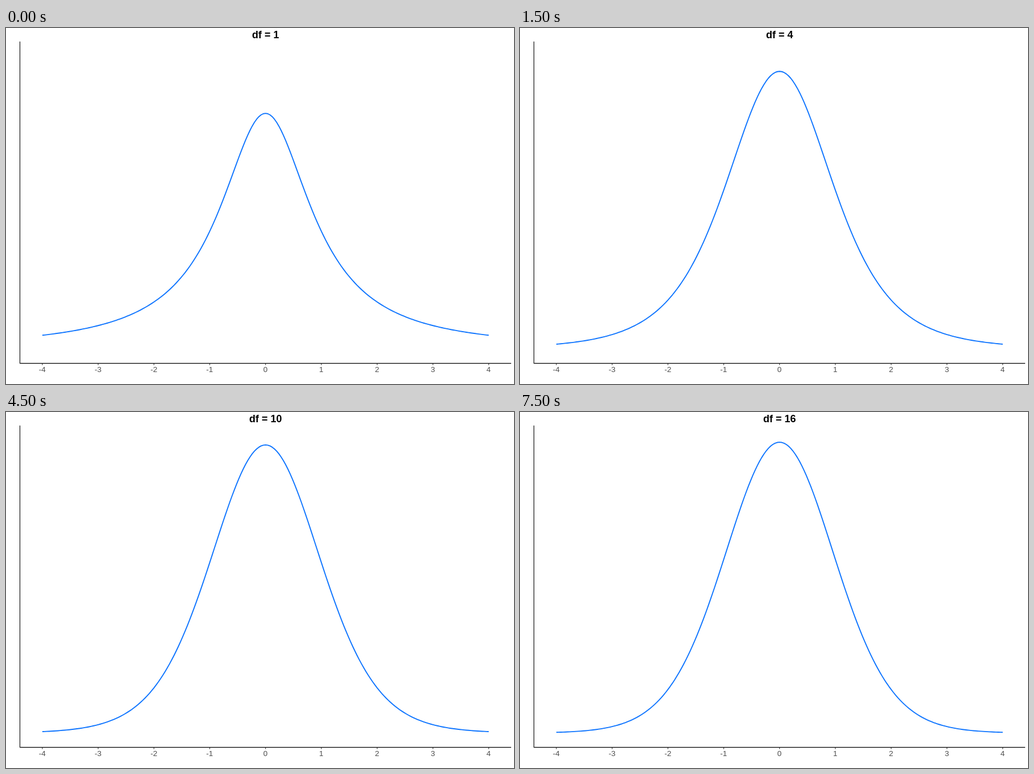
An HTML page that plays this animation: 894x626 px, repeating every 8 s.

```html
<!DOCTYPE html>
<html lang="en">
<head>
<meta charset="utf-8">
<title>Student t density by degrees of freedom</title>
<style>
  html, body { margin: 0; width: 100%; height: 100%; overflow: hidden; background: #fff; }
  svg { display: block; width: 894px; height: 626px; }
  text { font-family: "Liberation Sans", Arial, sans-serif; text-anchor: middle; }
  #title { font-size: 18px; font-weight: bold; }
  #labels { font-size: 13.5px; fill: #4d4d4d; }
  #curve { fill: none; stroke: #0f75ff; stroke-width: 1.9; stroke-linejoin: round; }
  .axis { fill: none; stroke: #000; stroke-width: 1.1; }
  #ticks { fill: none; stroke: #333; stroke-width: 1.1; }
</style>
</head>
<body>
<svg viewBox="0 0 894 626">
  <path class="axis" d="M24.5 23.7V589.6H889"/>
  <path id="ticks"/>
  <g id="labels"></g>
  <path id="curve"/>
  <text id="title" x="456.7" y="18"></text>
</svg>
<script>
const STEP = 500, MAX_DF = 16, SEGMENTS = 200;
const el = id => document.getElementById(id);
const px = x => 456.75 + 98.2 * x;
const py = density => 564.7 - 1302.5 * density;

// Gamma((n + 1) / 2) / Gamma(n / 2)
function gammaRatio(n) {
  if (n === 1) return 1 / Math.sqrt(Math.PI);
  if (n === 2) return Math.sqrt(Math.PI) / 2;
  return gammaRatio(n - 2) * (n - 1) / (n - 2);
}

function curvePath(df) {
  const peak = gammaRatio(df) / Math.sqrt(df * Math.PI);
  const points = Array.from({ length: SEGMENTS + 1 }, (_, i) => {
    const x = -4 + 8 * i / SEGMENTS;
    const density = peak * (1 + x * x / df) ** (-(df + 1) / 2);
    return px(x).toFixed(2) + " " + py(density).toFixed(2);
  });
  return "M" + points.join("L");
}

let ticks = "", labels = "";
for (let x = -4; x <= 4; x++) {
  ticks += `M${px(x)} 589.6v3.2`;
  labels += `<text x="${px(x) - 0.2}" y="605">${x}</text>`;
}
el("ticks").setAttribute("d", ticks);
el("labels").innerHTML = labels;

let shown = 0;
function draw(time) {
  const df = Math.floor(time / STEP) % MAX_DF + 1;
  if (df === shown) return;
  shown = df;
  el("title").textContent = "df = " + df;
  el("curve").setAttribute("d", curvePath(df));
}

const start = performance.now();
function frame() {
  draw(performance.now() - start);
  requestAnimationFrame(frame);
}
frame();
</script>
</body>
</html>
```
